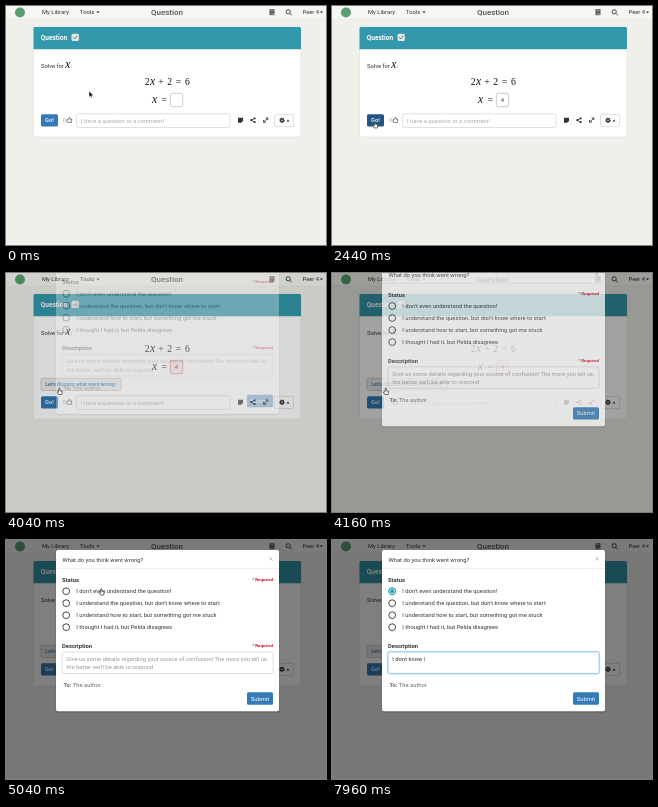
An HTML page for the animation above (8000 ms loop, 320 by 239 pixels).

```html
<!DOCTYPE html>
<html lang="en">
<head>
<meta charset="utf-8">
<title>Question</title>
<style>
html, body { margin: 0; height: 100%; overflow: hidden; background: #f0f0eb }
svg { display: block; width: 320px; height: 239px; font: 5.83px Roboto, sans-serif; fill: #333 }
text { white-space: pre }
.bold { font-weight: 700 }
.white { fill: #fff }
.muted { fill: #999 }
.box { fill: #fff; stroke: #ccc; stroke-width: .6 }
.line { fill: none; stroke: #333; stroke-width: .9 }
.math { font: 9.7px "Liberation Serif", serif; fill: #111 }
.math .var { font-size: 11.5px; font-style: italic }
.required { font-size: 4.4px; font-weight: 700; fill: #d0021b; text-anchor: end }
</style>
</head>
<body>
<svg viewBox="0 0 320 239">
  <rect width="320" height="13" fill="#f6f6f2"/>
  <path d="M0 13.2H320" stroke="#e4e4de" stroke-width=".5"/>
  <circle cx="14" cy="6.5" r="5" fill="#5aa06e"/>
  <text x="36" y="8.3">My Library</text>
  <text x="74" y="8.3">Tools</text>
  <path d="M90.3 5.4h3.4l-1.7 1.9zM313.8 5.4h3.4l-1.7 1.9z"/>
  <text x="161" y="9" text-anchor="middle" font-size="8" font-weight="500" fill="#555">Question</text>
  <path d="M263.5 3.2h5v6h-5z" fill="#555"/>
  <path d="M264.6 4.8h2.8M264.6 8h3.6" stroke="#f6f6f2" stroke-width=".6"/>
  <path class="line" d="M284 7.4l1.8 1.9M284.3 5.8a2.1 2.1 0 1 1-4.2 0a2.1 2.1 0 1 1 4.2 0"/>
  <text x="296.5" y="8.3">Peer 4</text>

  <rect id="panel" class="box" x="27.5" y="21" width="267.5" height="110" rx="1.5" style="stroke:#ddd"/>
  <path d="M27.5 43.3V22.5q0-1.5 1.5-1.5H293.500q1.500 0 1.500 1.500V43.300z" fill="#3498ac"/>
  <text class="bold white" x="34.800" y="34.200" font-size="6.500">Question</text>
  <rect x="65.500" y="27.700" width="7.400" height="7.400" rx="1.500" fill="#e3e6e6"/>
  <path class="line" d="M67.200 31.300l1.500 1.600 2.700-3.200" style="stroke:#667"/>
  <text x="35" y="62.300">Solve for</text>
  <g class="math">
    <text class="var" x="59.300" y="62.300">x</text>
    <text x="138.700 161.200 178.900" y="79.300">226</text>
    <text class="var" x="144" y="79.300">x</text>
    <text x="152.300 169.700" y="79.300">+=</text>
    <text class="var" x="146" y="96.500">x</text>
    <text x="155.500" y="96.500">=</text>
  </g>
  <text x="65" y="62.300">:</text>
  <rect id="answer" class="box" x="164.300" y="87.300" width="12.400" height="13.400" rx="1.700"/>
  <text id="digit" x="170.500" y="96.400" text-anchor="middle">4</text>

  <g id="discuss">
    <rect x="35" y="105.300" width="80" height="12.200" rx="1.500" fill="#ececec" stroke="#b8b8b8" stroke-width=".6"/>
    <text x="39.200" y="113.200" font-size="5.130" font-weight="500" fill="#337ab7">Let's discuss what went wrong</text>
  </g>
  <g id="actions">
    <rect id="go" x="35" y="108.300" width="17" height="12.300" rx="1.500"/>
    <text class="white" x="43.500" y="116.400" text-anchor="middle" font-weight="500">Go!</text>
    <text class="muted" x="57" y="116" font-size="5">0</text>
    <path class="line" d="M61 113.500h1.200l1.300-2.300q1.100.2.600 2h1.700l-.4 3.200h-3.200l-1.200-.5z" style="stroke-width:.6"/>
    <rect class="box" x="70.500" y="107.700" width="153.500" height="13.800" rx="1.800"/>
    <text class="muted" x="75" y="116.600" style="fill:#aaa">I have a question or a comment!</text>
    <path d="M232 111.700h5v3.200l-1.800 1.800H232z"/>
    <path class="line" d="M248.600 112.300l-3.400 1.900 3.400 2M257.800 116l3.800-3.700M259.600 112h2.200v2.200M257.600 114v2.200h2.200"/>
    <path d="M247.800 111.400h1.800v1.800h-1.800zM244.300 113.300h1.800v1.800h-1.800zM247.800 115.300h1.800v1.800h-1.800z"/>
    <rect class="box" x="268.500" y="108.300" width="19" height="12.300" rx="1.500"/>
    <circle class="line" cx="276" cy="114.300" r="1.500" style="stroke-width:1.400"/>
    <circle class="line" cx="276" cy="114.300" r="2.300" stroke-dasharray=".9"/>
    <path d="M280.500 115.400h3l-1.500-1.800z"/>
  </g>

  <rect id="shade" width="320" height="239"/>
  <g id="modal">
    <rect x="49.500" y="11" width="224" height="162" rx="2.500" opacity=".2"/>
    <rect class="white" x="50" y="10" width="223" height="161.300" rx="2"/>
    <path d="M50 28.500H273" stroke="#ddd" stroke-width=".5"/>
    <text x="56.500" y="22">What do you think went wrong?</text>
    <path class="line" d="M263.300 17.300l3.200 3.200m0-3.200l-3.200 3.200" style="stroke:#aaa;stroke-width:.7"/>
    <text class="bold" x="56" y="41.700">Status</text>
    <text id="needStatus" class="required" x="267" y="40.500">* Required</text>
    <g id="options"></g>
    <text class="bold" x="56" y="107.700">Description</text>
    <text id="needText" class="required" x="267" y="106.700">* Required</text>
    <rect id="glow" x="56" y="112" width="211" height="21.500" rx="1.700" fill="none" stroke="#66afe9" stroke-opacity=".3" stroke-width="2.500"/>
    <rect id="area" class="box" x="56" y="112" width="211" height="21.500" rx="1.700"/>
    <g id="hint" class="muted">
      <text x="60.300" y="120.700">Give us some details regarding your source of confusion! The more you tell us,</text>
      <text x="60.300" y="129">the better we'll be able to respond</text>
    </g>
    <text id="typed" x="60.300" y="120.700"></text>
    <text x="57.500" y="147.200" fill="#666"><tspan class="bold">To:</tspan> The author</text>
    <rect x="241" y="152.300" width="26" height="12.400" rx="1.500" fill="#337ab7"/>
    <text class="white" x="254" y="160.500" text-anchor="middle">Submit</text>
  </g>
  <path id="cursor" stroke-width=".6" stroke-linejoin="round"/>
</svg>
<script>
const $ = id => document.getElementById(id);
const clamp = v => Math.max(0, Math.min(1, v));
const show = (id, on) => $(id).style.display = on ? '' : 'none';
const set = (id, styles) => Object.assign($(id).style, styles);

$('options').innerHTML = [
  "I don't even understand the question!",
  "I understand the question, but don't know where to start",
  'I understand how to start, but something got me stuck',
  'I thought I had it, but Pelda disagrees'
].map((label, i) => `<circle class="line" cx="60.200" cy="${51.2 + 12 * i}" r="3.400"/>
  <text x="70.300" y="${53.2 + 12 * i}">${label}</text>`).join('') +
  '<g id="picked"><circle cx="60.200" cy="51.200" r="3.400" fill="#e4f6f8" stroke="#1fa8b8" stroke-width="1"/>' +
  '<circle id="dot" cx="60.200" cy="51.200" fill="#1fa8b8"/></g>';

const LOOP = 8000;
const ANSWER = 1120, RESULT = 2900, OPEN = 3955, PICK = 5950, FOCUS = 6640, TYPE = 6840;
const MESSAGE = 'I dont know ';
// time, x, y of the pointer tip
const PATH = [
  [160, 83, 85], [700, 180, 99], [960, 172, 96], [1120, 172, 96], [1560, 80, 106], [1700, 80, 106],
  [2350, 43, 115.500], [2900, 43, 115.500], [3500, 52, 115], [4360, 54, 115], [5020, 95.500, 48.500],
  [5500, 60, 60], [5880, 59, 50.500], [6000, 59, 50.500], [6640, 66, 130]
];
const SHAPES = {
  arrow: ['M0 0V6.300L1.500 5 2.500 7.200 3.400 6.800 2.500 4.700H4.500Z', '#000', '#fff'],
  hand: ['M-.6 .4Q0-.6.6.4V2.700L2.900 3.300 2.400 6.500H-.9L-2.400 4 -1.700 3.400-.6 4.300Z', '#fff', '#111'],
  beam: ['M-1.200-3H1.200M0-3V3M-1.200 3H1.200', 'none', '#333']
};

function pointer(t) {
  const next = PATH.findIndex(p => p[0] > t);
  if (next === 0) return PATH[0].slice(1);
  if (next < 0) return PATH.at(-1).slice(1);
  const [a, b] = [PATH[next - 1], PATH[next]];
  const k = (t - a[0]) / (b[0] - a[0]), ease = k * k * (3 - 2 * k);
  return [a[1] + (b[1] - a[1]) * ease, a[2] + (b[2] - a[2]) * ease];
}

function cursorShape(t, x, y) {
  if (t < 2000) return x > 164 && x < 177 && y > 87 && y < 101 ? 'beam' : 'arrow';
  if (t < 4400) return x < 52 || t > RESULT ? 'hand' : 'arrow';
  if (t < 6200) return y < 92 ? 'hand' : 'arrow';
  return y > 112 ? 'beam' : 'arrow';
}

function render(t) {
  const [x, y] = pointer(t);
  const wrong = t >= RESULT, focused = t >= FOCUS;

  show('digit', t >= ANSWER);
  set('answer', {
    fill: wrong ? '#fbe6e6' : '#fff',
    stroke: wrong ? '#d26a6a' : t > 980 && t < 2400 ? '#66afe9' : '#aaa'
  });
  set('go', { fill: t > 2000 && x < 52 && !wrong ? '#245580' : '#337ab7' });
  show('discuss', wrong);
  $('actions').setAttribute('transform', `translate(0 ${wrong ? 15 : 0})`);
  $('panel').setAttribute('height', wrong ? 125 : 110);

  const fade = clamp((t - OPEN) / 280);
  const slide = Math.sin(clamp((t - OPEN) / 560) * Math.PI / 2);
  set('shade', { fill: '#000', opacity: fade / 2 });
  set('modal', { opacity: fade });
  $('modal').setAttribute('transform', `translate(0 ${-40 * (1 - slide)})`);

  show('picked', t >= PICK);
  show('needStatus', t < PICK);
  $('dot').setAttribute('r', 2.1 * clamp((t - PICK) / 200));

  const count = Math.max(0, Math.floor((t - TYPE) / 92) + 1);
  show('needText', !count);
  show('hint', !count);
  show('glow', focused);
  set('area', { stroke: focused ? '#66afe9' : '#ccc' });
  $('typed').textContent = MESSAGE.slice(0, count) + (focused ? '|' : '');

  const [d, fill, stroke] = SHAPES[cursorShape(t, x, y)];
  show('cursor', !count);
  $('cursor').setAttribute('d', d);
  $('cursor').setAttribute('transform', `translate(${x} ${y})`);
  set('cursor', { fill, stroke });
}

function tick() {
  render(performance.now() % LOOP);
  requestAnimationFrame(tick);
}
tick();
</script>
</body>
</html>
```
